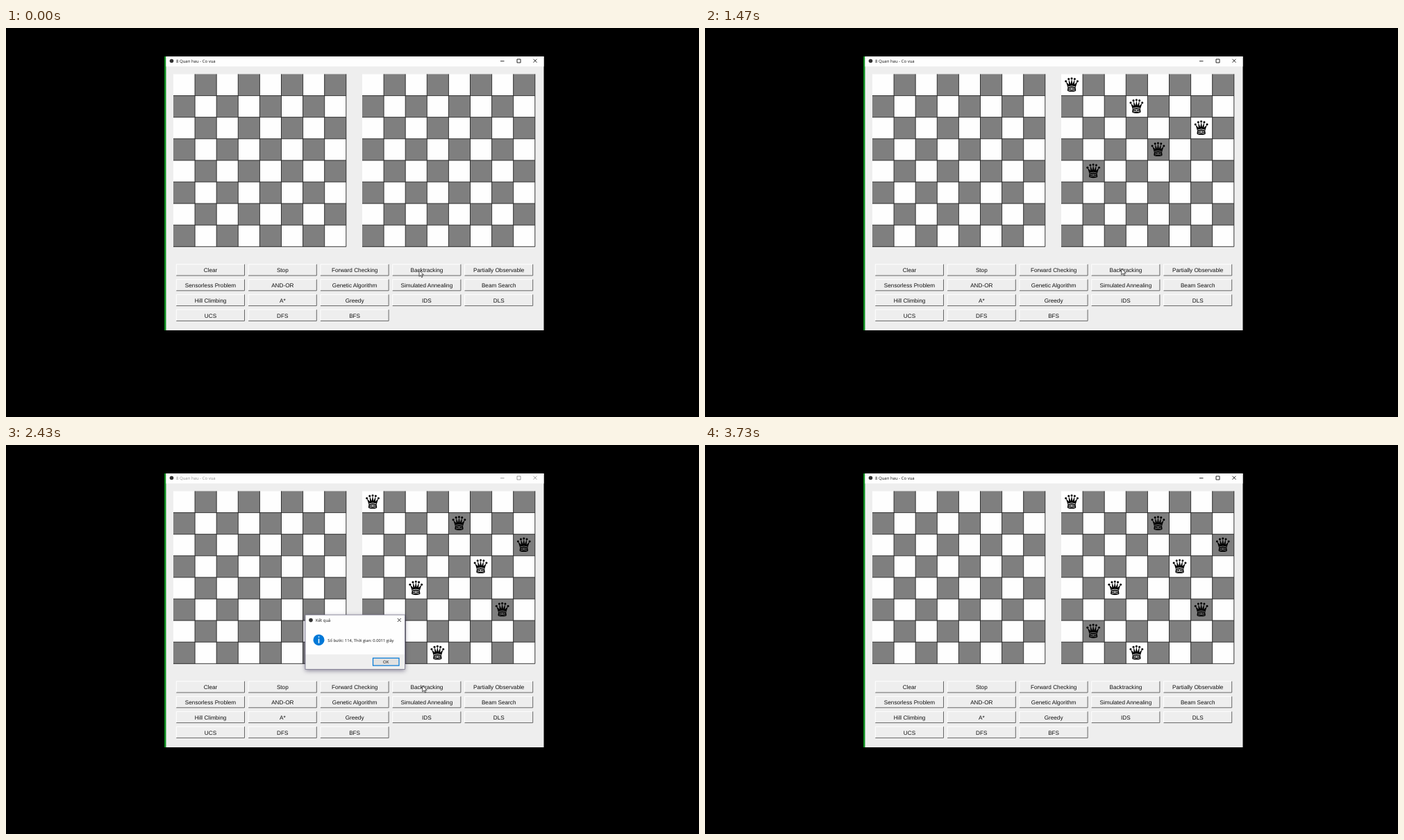
An HTML page that plays this animation: 998x561 px, repeating every 3760 ms.

```html
<!DOCTYPE html>
<html lang="vi">
<head>
<meta charset="utf-8">
<title>8 Quan hau</title>
<style>
html, body { margin: 0; width: 100%; height: 100%; overflow: hidden; background: #000; }
svg { display: block; width: 998px; height: 561px; text-rendering: geometricPrecision; }
.ui { font-family: "Open Sans", sans-serif; font-size: 6px; }
.btn { font-family: "Liberation Sans", Arial, sans-serif; font-size: 8.2px; text-anchor: middle; fill: #111; }
</style>
</head>
<body>
<svg id="stage" viewBox="0 0 998 561" xmlns="http://www.w3.org/2000/svg">
  <defs>
    <g id="queen">
      <path d="M-8.3-4.6L-4-.2-4.3-8-1.4-.8 0-8.6 1.4-.8 4.3-8 4-.2 8.3-4.6 6 2.8Q5.2 4.6 6 6.6 6.5 8.8 5.6 9.3 0 11-5.6 9.3-6.5 8.8-6 6.6-5.2 4.6-6 2.8Z"/>
      <circle cx="-8.4" cy="-4.9" r="1.5"/><circle cx="-4.3" cy="-8.2" r="1.5"/>
      <circle cy="-9" r="1.5"/><circle cx="4.3" cy="-8.2" r="1.5"/><circle cx="8.4" cy="-4.9" r="1.5"/>
      <path d="M-5.2 3.2Q0 1 5.2 3.2M-4.4 5.6Q0 4 4.4 5.6M-4.6 8Q0 6.6 4.6 8M0 4.8V7.2" fill="none" stroke="currentColor" stroke-width=".9"/>
    </g>
  </defs>
  <rect width="998" height="561"/>
  <rect x="228" y="41" width="3" height="395" fill="#0b8a1c"/>
  <rect x="230.5" y="41" width="544" height="395" fill="#eeeeee"/>
  <rect x="230.5" y="41" width="544" height="14.5" fill="#fefefe"/>
  <circle cx="238.5" cy="47.5" r="2.8" fill="#333"/>
  <g id="bar" fill="#111" stroke="#111">
    <text class="ui" x="245" y="49.7" stroke="none">8 Quan hau - Co vua</text>
    <path d="M712 47.8h5.5M736 45h5v5h-5zM759.5 44.8l5 5m0-5l-5 5" fill="none" stroke-width=".9"/>
  </g>
  <g id="boards"></g>
  <g id="queens"></g>
  <g id="buttons"></g>
  <g id="dialog">
    <rect x="431" y="245" width="143.5" height="78.5" fill="#fefefe" style="filter:drop-shadow(0 2px 3px rgba(30,20,60,.5))"/>
    <rect x="431" y="302" width="143.5" height="21.5" fill="#efefef"/>
    <rect x="431" y="245" width="143.5" height="78.5" fill="none" stroke="#77748a" stroke-width=".8"/>
    <circle cx="439" cy="252.6" r="2.8" fill="#333"/>
    <text class="ui" x="446" y="254.8" fill="#111">Kết quả</text>
    <path d="M563.8 250l5 5m0-5l-5 5" stroke="#222" stroke-width=".9"/>
    <circle cx="450.5" cy="281.2" r="8" fill="#0078d7"/>
    <path d="M450.5 279.5v6.3M450.5 276v1.6" stroke="#fff" stroke-width="1.5"/>
    <text class="ui" x="463.3" y="283.6" fill="#111" style="font-size:5.75px">Số bước: 114, Thời gian: 0.0011 giây</text>
    <rect id="ok" x="528.5" y="307.3" width="37.5" height="10.8" stroke="#0078d7" stroke-width="1.2"/>
    <text class="ui" x="547.2" y="314.9" text-anchor="middle" fill="#111">OK</text>
  </g>
  <path id="cursor" d="M0 0V8.8L2.1 6.9 3.6 10.1 5 9.4 3.6 6.4H6.4Z" fill="#fff" stroke="#222" stroke-width=".8"/>
</svg>
<script>
const LOOP = 3760, FRAME = 100 / 3;
const N = 8, CELL = 31.1, TOP = 66.5, LEFT = 241, RIGHT = 513;
const SOLVED = 66, OPEN = 67, CLOSE = 104;
const LABELS = [
  "Clear", "Stop", "Forward Checking", "Backtracking", "Partially Observable",
  "Sensorless Problem", "AND-OR", "Genetic Algorithm", "Simulated Annealing", "Beam Search",
  "Hill Climbing", "A*", "Greedy", "IDS", "DLS", "UCS", "DFS", "BFS"
];
const $ = id => document.getElementById(id);
const shade = (r, c) => (r + c) % 2 ? "#7f7f7f" : "#fefefe";

function board(x) {
  const size = CELL * N;
  let cells = "", lines = "";
  for (let r = 0; r < N; r++) {
    for (let c = 0; c < N; c++) {
      cells += `<rect x="${x + c * CELL}" y="${TOP + r * CELL}" width="${CELL + .1}" height="${CELL + .1}" fill="${shade(r, c)}"/>`;
    }
    const d = (r + 1) * CELL;
    lines += `M${x + d} ${TOP}v${size}M${x} ${TOP + d}h${size}`;
  }
  return `${cells}<path d="${lines}" stroke="#222" stroke-width=".9"/>`;
}

function button(label, i) {
  const x = 245.3 + i % 5 * 103.8, y = 340.8 + Math.floor(i / 5) * 21.8;
  return `<path d="M${x} ${y + 16.2}V${y}h98" fill="none" stroke="#fefefe"/>
    <path d="M${x} ${y + 16.2}h98.2V${y}" fill="none" stroke="#666"/>
    <text class="btn" x="${x + 49.2}" y="${y + 11.3}">${label}</text>`;
}

// Every placement made by depth-first backtracking until the first solution
function solve() {
  const steps = [[]];
  const safe = (cols, c) => cols.every((q, r) => q !== c && Math.abs(q - c) !== cols.length - r);
  const place = cols => {
    if (cols.length === N) return true;
    for (let c = 0; c < N; c++) {
      if (!safe(cols, c)) continue;
      const next = [...cols, c];
      steps.push(next);
      if (place(next)) return true;
    }
    return false;
  };
  place([]);
  return steps;
}

const queen = (c, r) =>
  `<use href="#queen" x="${RIGHT + (c + .5) * CELL - .5}" y="${TOP + (r + .5) * CELL - .4}" color="${shade(r, c)}"/>`;

function glide(t, from, to, a, b) {
  const p = Math.min(1, Math.max(0, (t - from) / (to - from)));
  const e = p * p * (3 - 2 * p);
  return a.map((v, i) => v + (b[i] - v) * e);
}

const steps = solve();
$("boards").innerHTML = board(LEFT) + board(RIGHT);
$("buttons").innerHTML = LABELS.map(button).join("");
let shown = -1;

function draw(time) {
  const k = Math.floor((time + 5) / FRAME), t = k * FRAME;
  const run = Math.round(20.4 + (k - 17) * 1.894);
  const step = k >= SOLVED ? steps.length - 1 : Math.min(steps.length - 1, Math.max(0, run));
  if (step !== shown) {
    $("queens").innerHTML = steps[step].map(queen).join("");
    shown = step;
  }

  const open = k >= OPEN && k < CLOSE;
  $("dialog").style.display = open ? "" : "none";
  $("bar").setAttribute("opacity", open ? .45 : 1);

  const [x, y] = t < 1000
    ? glide(t, 0, 200, [595, 349.5], [599.8, 347])
    : glide(t, 2750, 3150, [599.8, 347], [539.2, 309]);
  $("cursor").setAttribute("transform", `translate(${x} ${y})`);
  $("cursor").style.display = k < CLOSE ? "" : "none";
  $("ok").setAttribute("fill", t > 3100 ? "#e5f1fb" : "#e1e1e1");
}

const start = performance.now();
function tick() {
  draw((performance.now() - start) % LOOP);
  requestAnimationFrame(tick);
}
tick();
</script>
</body>
</html>
```
